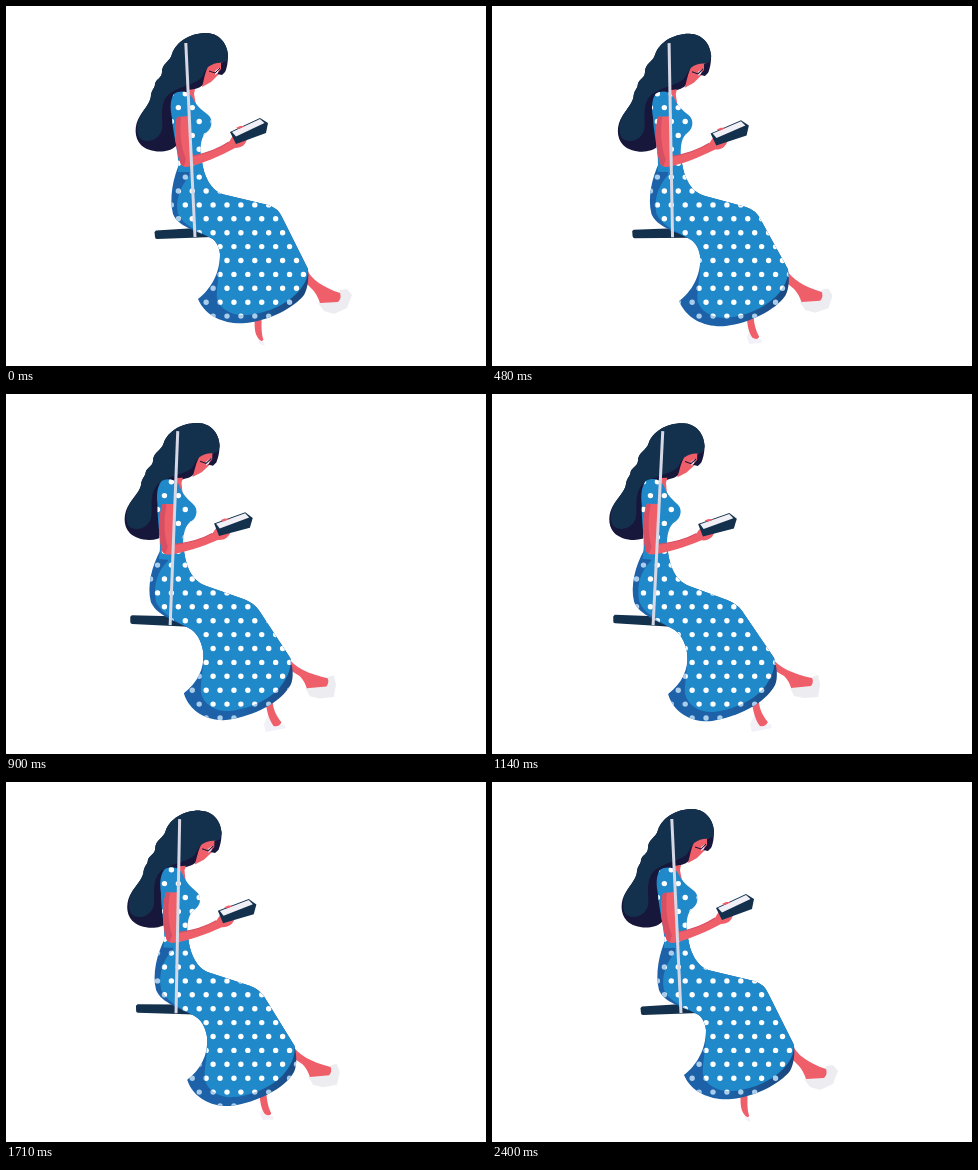
An HTML page with a canvas that plays this animation: 480 by 360 pixels, repeating every 2430 ms.

```html
<!DOCTYPE html>
<html lang="en">
<head>
<meta charset="utf-8">
<title>Reading on a swing</title>
<style>
  html, body { margin: 0; width: 100%; height: 100%; overflow: hidden; background: #fff; }
  canvas { display: block; width: 480px; height: 360px; }
</style>
</head>
<body>
<canvas id="stage" width="480" height="360"></canvas>
<script>
const ctx = document.getElementById('stage').getContext('2d');
const LOOP = 2430, HALF = LOOP / 2;
const PIVOT = [174.5, -56];
const NAVY = '#13304d', DUSK = '#17163b', SKIN = '#ef5f6a', ROSE = '#d64f62';
const BLUE = '#2089ca', DEEP = '#1d62a8', SHOE = '#ededf1';

// Forward and backward extremes of the parts that bend.
const skirt = [
  'M174 156 L195 150 C197 168 204 186 220 189 L262 199 Q272 202 276 211 L302 263 C303 272 302 282 298 289 C288 302 262 315 240 317 C222 319 200 312 192 293 C204 284 214 268 214 248 C213 238 208 233 203 231 C192 225 172 221 167 208 C163 192 167 172 174 156Z',
  'M152 156 L175 151 C177 171 182 186 197 192 L235 206 Q245 210 250 217 L282 264 C285 274 286 284 283 291 C273 310 245 323 220 327 C203 329 182 321 176 300 C189 290 197 276 195 259 C193 247 188 239 181 235 C168 228 147 221 142 208 C138 192 143 172 152 156Z'
];
const skirtLight = [
  'M184 158 L195 150 C197 168 204 186 220 189 L262 199 Q272 202 276 211 L302 263 C302 270 300 276 296 281 C286 296 262 308 240 309 C226 310 214 303 211 293 C210 282 214 268 214 248 C213 238 208 233 203 231 C192 225 177 219 172 208 C169 194 174 182 183 170Z',
  'M162 158 L175 151 C177 171 182 186 197 192 L235 206 Q245 210 250 217 L282 264 C283 272 281 280 277 286 C268 304 245 315 222 318 C208 319 196 312 193 300 C192 288 196 276 195 259 C193 247 188 239 181 235 C168 228 151 219 147 207 C144 190 149 176 159 167Z'
];
const frontLeg = [
  'M300 262 C305 273 316 281 334 287 Q336 292 332 296 L314 297 Q311 288 306 283 L299 276Z',
  'M280 264 C286 273 301 280 320 284 Q322 288 319 292 L299 294 Q297 287 292 282 L280 275Z'
];
const frontShoe = [
  'M312 297 L318 305 L328 308 L341 302 L346 289 L341 283 L334 284 L330 294Z',
  'M298 294 L302 302 L312 304 L326 303 L328 291 L326 281 L320 283 L318 290Z'
];
const backLeg = [
  'M248 308 L255 308 C256 317 254 325 257 334 Q255 337 251 331 C247 324 249 316 248 308Z',
  'M259 304 L267 302 C266 314 271 322 276 328 Q274 333 268 332 C262 324 261 314 259 304Z'
];
const backShoe = [
  'M251 332 L253 330 L256 335 L258 337 L258 340 L254 338Z',
  'M258 330 L263 320 L268 331 L279 330 L280 334 L260 338Z'
];

const hair = 'M200 27 C212 27 221 36 222 49 C222 56 221 62 219 66 L214 58 C206 58 203 63 201 70 C199 77 197 80 192 82 C186 84 180 86 173 90 C169 98 167 105 168 114 C170 124 174 132 170 140 C162 148 143 147 135 139 C128 132 128 119 134 110 C139 102 145 96 145 89 C146 83 149 82 149 78 C150 73 156 72 156 66 C156 57 164 56 166 48 C170 36 184 27 200 27Z';
const hairLight = 'M200 27 C212 27 221 36 222 49 L220 59 C206 55 200 62 197 69 C193 78 178 78 163 88 C152 98 158 116 156 124 C152 136 138 138 133 131 C129 123 132 112 136 107 C140 101 145 95 145 89 C146 83 149 82 149 78 C150 73 156 72 156 66 C156 57 164 56 166 48 C170 36 184 27 200 27Z';
const torso = 'M168 88 C174 84 182 85 186 91 C191 101 196 104 201 108 C207 112 207 121 201 126 C195 130 194 140 195 150 L198 166 L172 166 C174 150 167 130 166 112 C164 102 164 94 168 88Z';
const arm = 'M171 111 L183 110 C183 124 184 139 187 150 C203 147 214 142 223 136 C228 128 231 122 235 121 L241 133 C240 138 236 142 229 142 C214 150 196 158 181 161 Q175 161 174 156 C169 140 168 124 171 111Z';

const blend = ([a, b], k) => {
  const to = b.match(/[\d.]+/g);
  let i = 0;
  return a.replace(/[\d.]+/g, n => +n + (to[i++] - n) * k);
};

// Cubic bezier (.5, 0, .5, 1).
function ease(x) {
  let u = x;
  for (let i = 0; i < 8; i++) {
    u -= (1.5 * u - 1.5 * u * u + u ** 3 - x) / (1.5 - 3 * u + 3 * u * u);
  }
  return u * u * (3 - 2 * u);
}

function swing(time) {
  const t = time % LOOP;
  return t < HALF ? ease(t / HALF) : 1 - ease(t / HALF - 1);
}

function fill(d, color) {
  ctx.fillStyle = color;
  ctx.fill(new Path2D(d));
}

function line(d, color, width) {
  ctx.strokeStyle = color;
  ctx.lineWidth = width;
  ctx.stroke(new Path2D(d));
}

function rotate(angle, x, y) {
  ctx.translate(x, y);
  ctx.rotate(angle);
  ctx.translate(-x, -y);
}

function turned(angle, x, y, draw) {
  ctx.save();
  rotate(angle, x, y);
  draw();
  ctx.restore();
}

// The polka dots stay still while the cloth moves over them.
const dots = new Path2D();
for (let row = -9; row < 10; row++) {
  for (let col = -9; col < 8; col++) {
    const x = 221 + (col + (row & 1) / 2) * 13.9, y = 198.9 + row * 13.9;
    dots.moveTo(x + 2.7, y);
    dots.arc(x, y, 2.7, 0, 7);
  }
}

function dotted(d, color, dotColor, angle = 0) {
  ctx.save();
  rotate(angle, ...PIVOT);
  ctx.clip(new Path2D(d));
  rotate(-angle, ...PIVOT);
  ctx.fillStyle = color;
  ctx.fillRect(0, 0, 480, 360);
  ctx.fillStyle = dotColor;
  ctx.fill(dots);
  ctx.restore();
}

const hem = ctx.createLinearGradient(235, 0, 295, 0);
hem.addColorStop(0, DEEP);
hem.addColorStop(1, '#1a4880');

function drawHead() {
  fill(hair, DUSK);
  fill(hairLight, NAVY);
  fill('M202 61 C207 57 213 56 218 57 L217 64 L211 70 L205 76 L196 81 C198 74 199 66 202 61Z', SKIN);
  fill('M215 57 L221 55 L219 66 L216 69 L211 68 L215 63Z', DUSK);
  fill('M209 65 L213 62 L212 67 L209 69Z', '#f3dfe6');
  line('M203 65 L209 67 L214 62', DUSK, 1);
}

function drawBook() {
  fill('M224 126 L254 112 L262 117 L260 127 L230 138Z', NAVY);
  fill('M226 126 L254 113 L258.5 117 L230 130.5Z', '#f1f0f6');
  fill('M230 122 L234 120 L239 120 L233 123Z', SKIN);
}

function render(time) {
  const k = swing(time), kick = swing(time + 150), lean = k * 0.0976;
  const onSwing = draw => turned(lean, ...PIVOT, draw);

  ctx.clearRect(0, 0, 480, 360);
  onSwing(() => fill('M150 224.5 L190 222 L207 231 L151 233 Q149 233 149 231 L148.5 226Z', NAVY));

  fill(blend(backShoe, kick), '#f3f1f8');
  fill(blend(backLeg, kick), SKIN);
  fill(blend(frontShoe, k), SHOE);
  fill(blend(frontLeg, k), SKIN);

  turned(k * 0.04, 137, -185, drawHead);
  onSwing(() => fill('M182 84 L189 83 L188 88 L190 99 L179 90Z', SKIN));

  dotted(blend(skirt, k), hem, '#a9cdea');
  dotted(torso, BLUE, '#fff', lean);
  dotted(blend(skirtLight, k), BLUE, '#fff');

  onSwing(() => {
    fill(arm, SKIN);
    fill('M171 111 L175 111 C173 128 176 145 180 153 L178 160 Q175 160 174 156 C169 140 168 124 171 111Z', ROSE);
    line('M187 150 C203 147 214 142 223 136', ROSE, 1.2);
    drawBook();
    line('M179.8 37 L189 231', '#d6d8e6', 3);
  });
}

function tick() {
  render(performance.now());
  requestAnimationFrame(tick);
}
tick();
</script>
</body>
</html>
```
